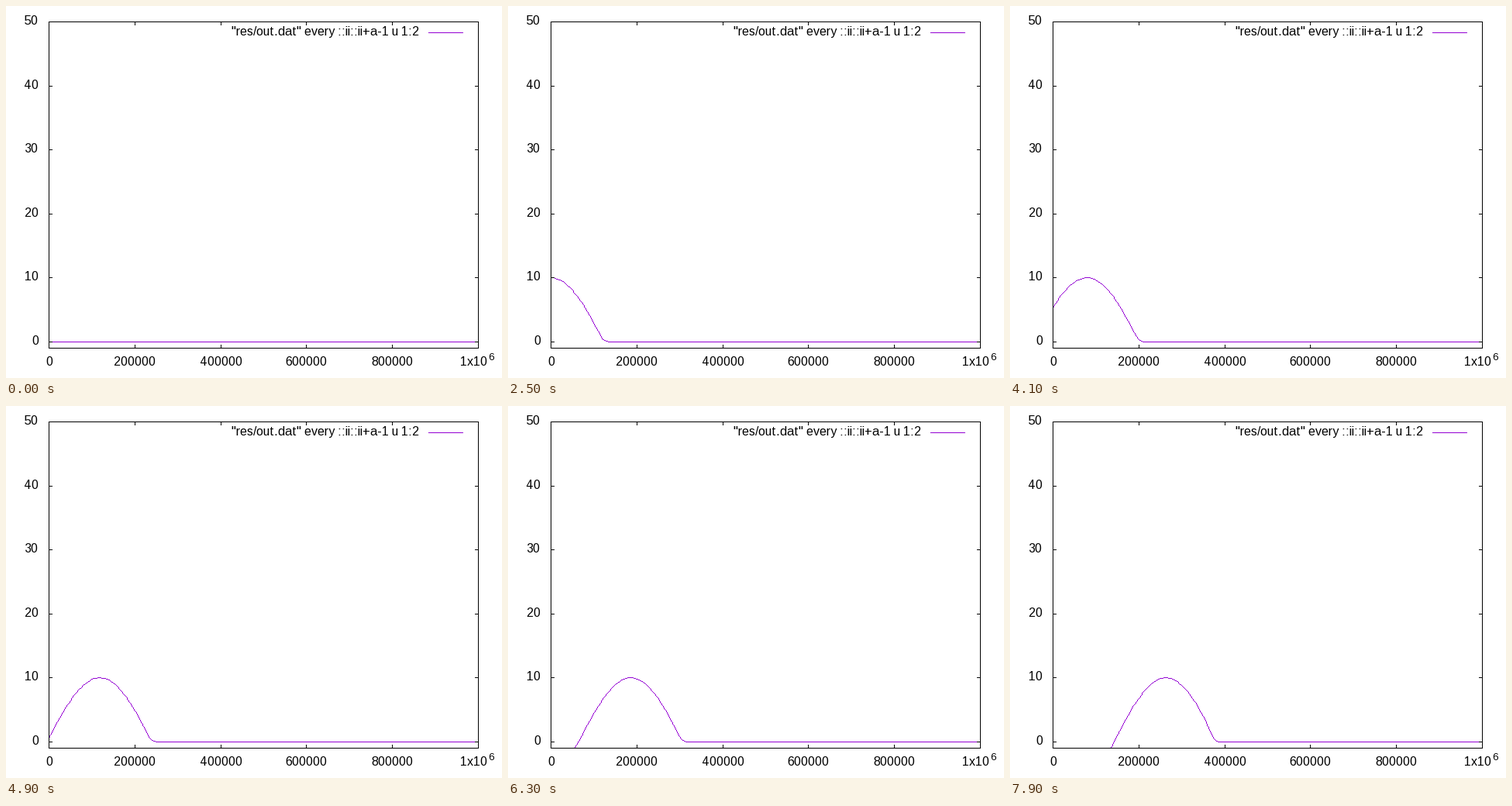
Recreate the animation shown at these times as a matplotlib script. Size 640 by 480 pixels, loop 8000 ms.

```python
import numpy as np
import matplotlib as mpl
import matplotlib.pyplot as plt
from matplotlib.animation import FuncAnimation

W, H, DPI = 640, 480, 100
LEFT, RIGHT, TOP, BOTTOM = 55, 609, 20, 441
FRAMES, STEP = 80, 100

BLACK, PURPLE = (0, 0, 0), (148, 0, 211)

mpl.rcParams.update({
    "font.family": "Liberation Sans",
    "text.hinting": "force_autohint",
    "text.hinting_factor": 1,
})


def px(x):
    return np.rint(LEFT + np.asarray(x) / 1e6 * (RIGHT - LEFT)).astype(int)


def py(y):
    return np.rint(BOTTOM - (np.asarray(y) + 1) / 51 * (BOTTOM - TOP)).astype(int)


def trace(xs, ys):
    """Pixels of a one-pixel-wide polyline."""
    cols, rows = [], []
    for x0, y0, x1, y1 in zip(xs[:-1], ys[:-1], xs[1:], ys[1:]):
        n = max(abs(x1 - x0), abs(y1 - y0)) + 1
        cols.append(np.rint(np.linspace(x0, x1, n)))
        rows.append(np.rint(np.linspace(y0, y1, n)))
    return np.concatenate(cols).astype(int), np.concatenate(rows).astype(int)


# Distance in pixels covered by the wave after a travel time in seconds
TRAVEL = np.linspace(0, 8.4, 841)
DIST = 27.5 * TRAVEL - 0.1 * TRAVEL**2 - 3 * np.maximum(TRAVEL - 7, 0)**2

GRID = np.linspace(0, 1e6, 201)
GRID_PX = px(GRID)
ARRIVAL = np.interp(GRID / 1e6 * (RIGHT - LEFT), DIST, TRAVEL)


def wave(t):
    """Sine driven from the left edge, with a softened front."""
    s = 0.06 * np.logaddexp(0, (t - ARRIVAL) / 0.06)
    return 10 * np.sin(np.pi / 5 * s) * (t > 0)


def draw_frame(img):
    img[[TOP, BOTTOM], LEFT:RIGHT + 1] = BLACK
    img[TOP:BOTTOM + 1, [LEFT, RIGHT]] = BLACK
    for x in px(np.arange(0, 1.1e6, 2e5)):
        img[TOP:TOP + 5, x] = BLACK
        img[BOTTOM - 4:BOTTOM + 1, x] = BLACK
    for y in py(np.arange(0, 51, 10)):
        img[y, LEFT:LEFT + 5] = BLACK
        img[y, RIGHT - 4:RIGHT + 1] = BLACK
    img[34, 545:590] = PURPLE


def render(t):
    img = np.full((H, W, 3), 255, np.uint8)
    cols, rows = trace(GRID_PX, py(wave(t)))
    inside = rows < BOTTOM
    img[rows[inside], cols[inside]] = PURPLE
    draw_frame(img)
    return img


fig = plt.figure(figsize=(W / DPI, H / DPI), dpi=DPI, facecolor="white")
ax = fig.add_axes([0, 0, 1, 1])
picture = ax.imshow(render(0), extent=(0, W, H, 0), interpolation="nearest",
                    aspect="auto")
ax.set(xlim=(0, W), ylim=(H, 0))
ax.axis("off")


def label(x, y, s, ha, size=16):
    ax.text(x, y, s, ha=ha, va="baseline", fontsize=size * 72 / DPI)


for v in range(0, 51, 10):
    label(42, py(v) + 4, str(v), "right")
for v in range(0, 1000000, 200000):
    label(px(v) + 0.5, 464, str(v), "center")
label(586, 464, "1x10", "left")
label(622, 457, "6", "left", 12.8)
label(533, 38, '"res/out.dat" every ::ii::ii+a-1 u 1:2', "right")


def update(i):
    picture.set_data(render(i * STEP / 1000))
    return (picture,)


anim = FuncAnimation(fig, update, frames=FRAMES, interval=STEP,
                     repeat=True, repeat_delay=0)
plt.show()
```
